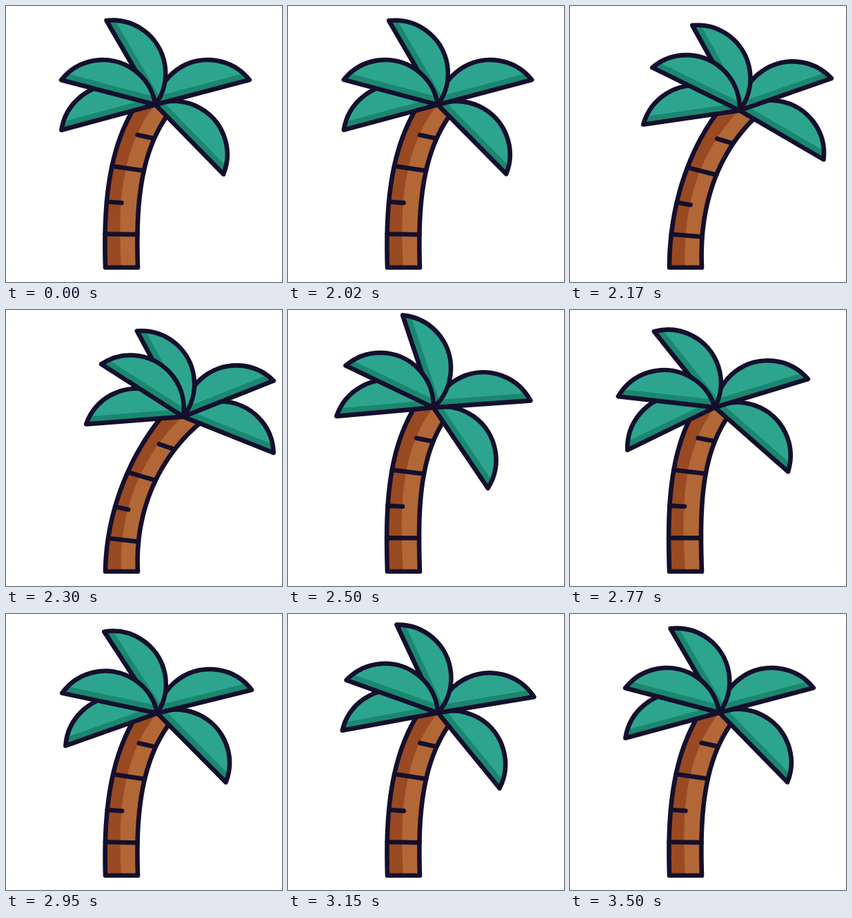
Recreate the animation shown at these times as an HTML page with a canvas. Size 400 by 400 pixels, loop 3.52 s.

```html
<!DOCTYPE html>
<html lang="en">
<head>
<meta charset="utf-8">
<title>Palm in the wind</title>
<style>
  html, body { margin: 0; width: 100%; height: 100%; overflow: hidden; background: #fff; }
  canvas { display: block; width: 100vw; height: 100vh; }
</style>
</head>
<body>
<canvas id="stage" width="400" height="400"></canvas>
<script>
const ctx = document.getElementById('stage').getContext('2d');
const LOOP = 3520;
const INK = '#140f2d';
const GREEN = '#2da58e', GREEN_DARK = '#1b8770';
const BROWN = '#b26737', BROWN_DARK = '#994a22';
const LEAF_LENGTH = 141, LEAF_BULGE = 46, LEAF_SHADE = 11;

// Keys are [time, value] pairs; each one is an eased resting point.
const LEAN = [[2000, 0], [2270, 1.04], [2600, -0.45], [2920, 0.07], [3300, 0]];
const SWAY_TIMES = [2000, 2290, 2510, 2800, 3130, 3490];

// Back to front. side: +1 for leaves on the left, -1 on the right.
const LEAVES = [
  { angle: 45.6, side: -1, sway: [0, -24, 10.5, -4.7, 5.2, 0] },
  { angle: -14.8, side: -1, sway: [0, -7, 10.8, -2.5, 5.4, 0] },
  { angle: 164.9, side: 1, sway: [0, 10.7, 10, -11.4, 4.7, 0] },
  { angle: 239.8, side: 1, sway: [0, 1.8, 11.8, -9, 5.1, 0] },
  { angle: 194.7, side: 1, sway: [0, 18, 10.8, -8.7, 5, 0] }
].map(leaf => ({ ...leaf, keys: SWAY_TIMES.map((time, i) => [time, leaf.sway[i]]) }));

const mix = (a, b, k) => a + (b - a) * k;

function valueAt(keys, time) {
  if (time <= keys[0][0]) return keys[0][1];
  for (let i = 1; i < keys.length; i++) {
    const [t0, v0] = keys[i - 1], [t1, v1] = keys[i];
    if (time < t1) return mix(v0, v1, 0.5 - 0.5 * Math.cos(Math.PI * (time - t0) / (t1 - t0)));
  }
  return keys[keys.length - 1][1];
}

function makeTrunk(lean) {
  const p = [
    [167.5, 379],
    [mix(164.5, 166, lean), mix(284, 290, lean)],
    [mix(172, 202, lean), mix(204, 208, lean)],
    [mix(216.5, 256.5, lean), mix(143, 154.5, lean)]
  ];
  const axis = (t, i) => {
    const s = 1 - t;
    return s * s * s * p[0][i] + 3 * s * s * t * p[1][i] + 3 * s * t * t * p[2][i] + t * t * t * p[3][i];
  };
  const slope = (t, i) => {
    const s = 1 - t;
    return s * s * (p[1][i] - p[0][i]) + 2 * s * t * (p[2][i] - p[1][i]) + t * t * (p[3][i] - p[2][i]);
  };
  // A point across the trunk: offset -1 is the left edge, +1 the right.
  const point = (t, offset, turn = 1) => {
    const tilt = t === 0 ? 0 : Math.atan2(slope(t, 0), -slope(t, 1)) * turn;
    const half = 23.5 - 0.4 * t - 2.5 * Math.max(0, lean) * Math.sin(Math.PI * t);
    return [axis(t, 0) + offset * half * Math.cos(tilt), axis(t, 1) + offset * half * Math.sin(tilt)];
  };
  return { point, top: p[3] };
}

function trace(points) {
  ctx.beginPath();
  points.forEach(([x, y]) => ctx.lineTo(x, y));
}

function drawTrunk({ point }) {
  const steps = Array.from({ length: 33 }, (_, i) => i / 32);
  const left = steps.map(t => point(t, -1));
  // The right edge runs on a little so that its end stays under the leaves.
  const right = steps.map(t => point(t * 1.06, 1)).reverse();
  const middle = steps.map(t => point(t, -0.02 - 0.1 * Math.sin(Math.PI * t))).reverse();

  trace([...left, ...right]);
  ctx.fillStyle = BROWN;
  ctx.fill();
  trace([...left, ...middle]);
  ctx.fillStyle = BROWN_DARK;
  ctx.fill();
  trace([...left, ...right]);
  ctx.closePath();
  ctx.stroke();

  for (const [t, from, to] of [[0.174, -1, 1], [0.348, -1, -0.08], [0.555, -1, 1], [0.775, -0.05, 0.95]]) {
    const turn = 1 - 0.6 * t;
    trace([point(t, from, turn), point(t, to, turn)]);
    ctx.stroke();
  }
}

const half = LEAF_LENGTH / 2;
const radius = (half * half + LEAF_BULGE * LEAF_BULGE) / (2 * LEAF_BULGE);
const drop = radius - LEAF_BULGE;
const leafPath = new Path2D();
leafPath.arc(half, -drop, radius, Math.atan2(drop, -half), Math.atan2(drop, half), true);
leafPath.closePath();

function drawLeaf([x, y], degrees, side) {
  ctx.save();
  ctx.translate(x, y);
  ctx.rotate(degrees * Math.PI / 180);
  ctx.scale(1, side);
  ctx.fillStyle = GREEN;
  ctx.fill(leafPath);
  ctx.save();
  ctx.clip(leafPath);
  ctx.fillStyle = GREEN_DARK;
  ctx.fillRect(-10, 0, LEAF_LENGTH + 20, LEAF_SHADE);
  ctx.restore();
  ctx.stroke(leafPath);
  ctx.restore();
}

function draw(time) {
  ctx.fillStyle = '#fff';
  ctx.fillRect(0, 0, 400, 400);
  ctx.strokeStyle = INK;
  ctx.lineWidth = 6.6;
  ctx.lineJoin = ctx.lineCap = 'round';
  const trunk = makeTrunk(valueAt(LEAN, time));
  drawTrunk(trunk);
  for (const { angle, side, keys } of LEAVES) {
    drawLeaf(trunk.top, angle + valueAt(keys, time), side);
  }
}

const start = performance.now();
function frame() {
  draw((performance.now() - start) % LOOP);
  requestAnimationFrame(frame);
}
frame();
</script>
</body>
</html>
```
